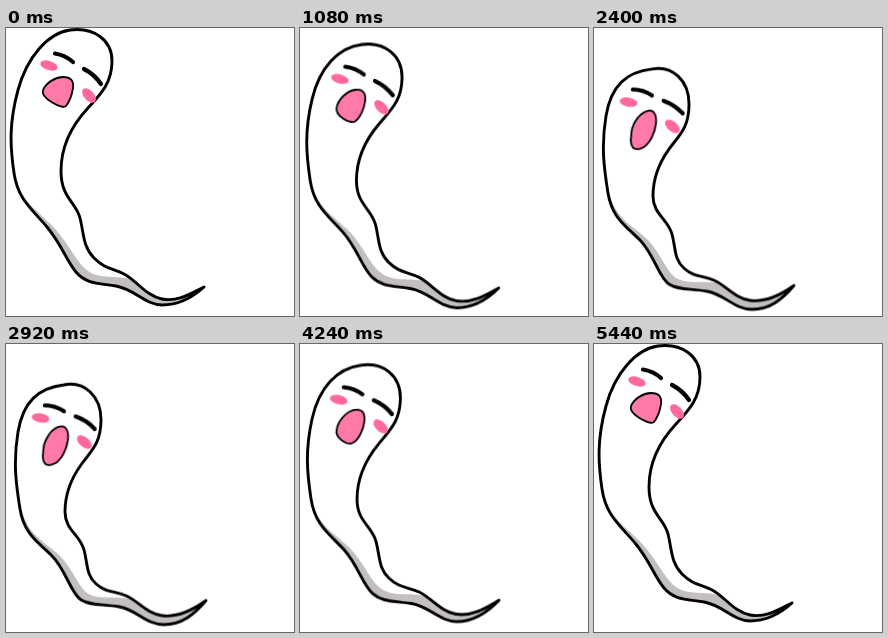
An HTML page without scripts that plays this animation: 288x288 px, repeating every 5640 ms.

```html
<!DOCTYPE html>
<html lang="en">
<head>
<meta charset="utf-8">
<title>Yawning ghost</title>
<style>
  html, body { margin: 0; width: 100%; height: 100%; overflow: hidden; background: #fff; }
  svg { display: block; width: 100%; height: 100%; }

  .body, .face, .mouth {
    --sink: cubic-bezier(.45, .1, .6, 1);
    --rise: cubic-bezier(.3, .2, .65, 1);
    animation: 5640ms infinite var(--sink);
  }
  .body { animation-name: body; }
  .face { animation-name: face; transform-origin: 63px 52.5px; }
  .mouth { animation-name: mouth; fill: #ff7aa6; stroke: #000; stroke-width: 1.8; }
  .ghost { animation: sway 5640ms infinite ease-in-out; }

  .skin { fill: #fff; }
  .shadow { fill: #c3bfbf; }
  .lit { transform: rotate(-4.6deg); transform-origin: 10px 150px; }
  .outline { fill: none; stroke: #000; stroke-width: 2.9; stroke-linejoin: round; }
  .cheek { fill: #ff6a9b; }
  .eyes { fill: none; stroke: #000; stroke-width: 4.2; stroke-linecap: round; }

  /* Two poses, stretched and slumped, with easing between them. */
  @keyframes body {
    0%, 2.1%, 96.5%, 100% { d: path("M64 2 C88 -1 106 12 106 33 S96 65 82 80 S55 116 55 143 S70 174 74 190 S77 219 88 230 S106 240 118 246 S140 268 156 271 S184 266 198 259 C186 270 172 277 156 277 S128 261 110 258 S80 256 70 244 S56 217 41 199 S12 172 8 145 S3 95 12 62 S42 5 64 2Z"); }
    44%, 54.6% { d: path("M58 41 C78 37 95 52 95 76 S85 107 75 121 S59 150 59 168 S74 191 78 206 S80 231 90 240 S108 247 120 252 S141 270 156 272 S186 267 200 257 C188 271 176 281 158 281 S131 266 113 263 S85 262 75 256 S60 226 46 212 S18 190 14 165 S7 118 12 88 S32 44 58 41Z"); }
    54.6% { animation-timing-function: var(--rise); }
  }

  @keyframes mouth {
    0%, 2.1%, 96.5%, 100% { d: path("M37 62 C40 55 49 49 57 49 S68 53 67 60 S63 74 60 78 S34 70 37 62Z"); }
    44%, 54.6% { d: path("M41 71 C42 62 50 51 59 49 S69 55 67 63 S58 83 49 85 S38 80 41 71Z"); }
    54.6% { animation-timing-function: var(--rise); }
  }

  @keyframes face {
    0%, 2.1%, 96.5%, 100% { transform: none; }
    44%, 54.6% { transform: translate(-6.5px, 33.7px) rotate(-8deg); }
    54.6% { animation-timing-function: var(--rise); }
  }

  @keyframes sway {
    0%, 100% { transform: skewY(0deg); }
    20% { transform: skewY(.5deg); }
    75% { transform: skewY(-.5deg); }
  }
</style>
</head>
<body>
<svg viewBox="0 0 288 288">
  <clipPath id="inside"><path class="body"/></clipPath>
  <g class="ghost">
    <path class="body skin"/>
    <g clip-path="url(#inside)">
      <rect class="shadow" y="150" width="288" height="138"/>
      <g class="lit"><path class="body skin"/></g>
    </g>
    <path class="body outline"/>
    <g class="face">
      <ellipse class="cheek" rx="9" ry="4.6" transform="translate(43 37.5) rotate(18)"/>
      <ellipse class="cheek" rx="8.8" ry="5" transform="translate(83 67.5) rotate(48)"/>
      <path class="mouth"/>
      <path class="eyes" d="M49 25.5 Q59 27 67 34 M78 41 Q88 46 95 56"/>
    </g>
  </g>
</svg>
</body>
</html>
```
